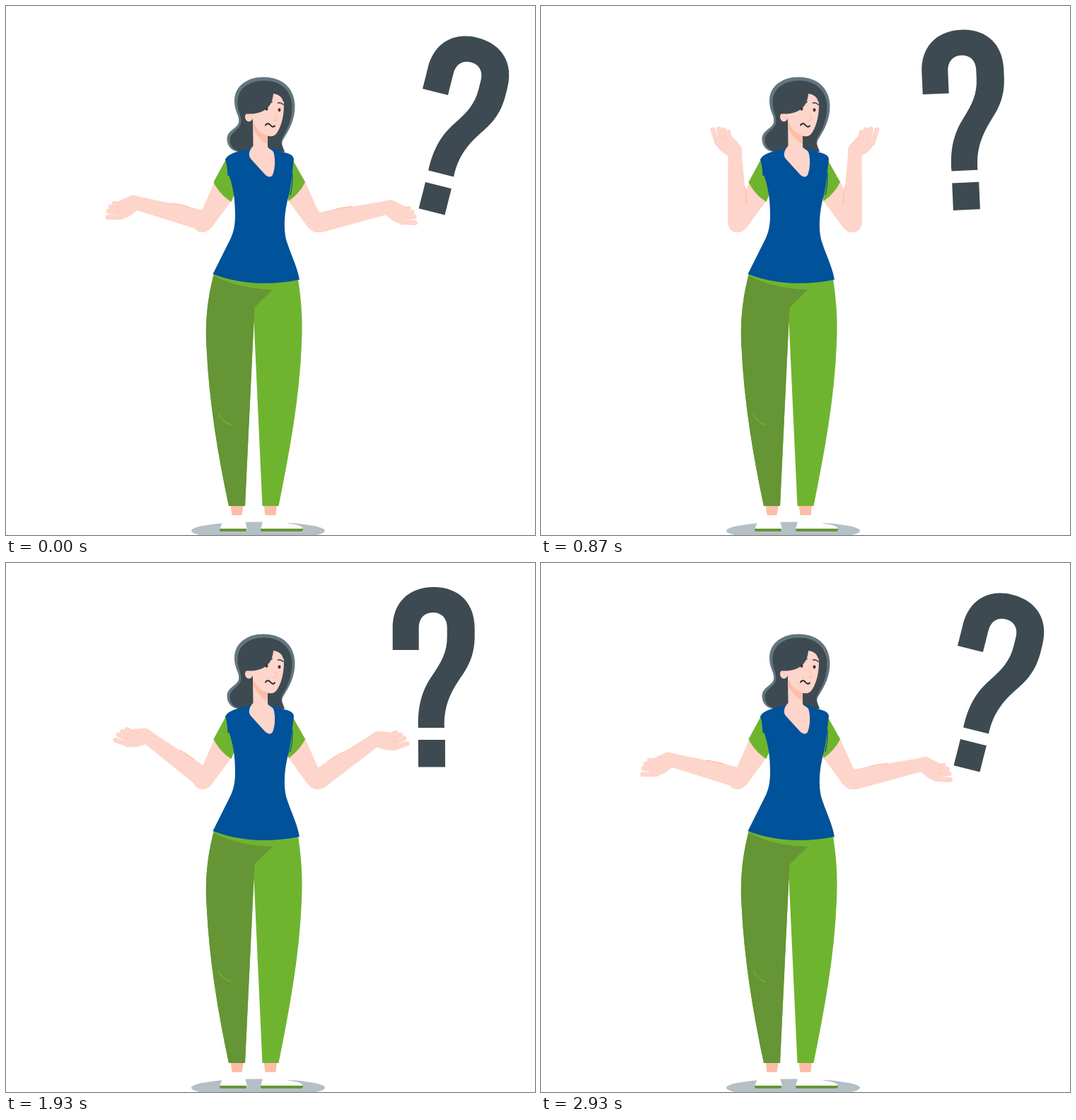
Animation of 748x748 px, one loop 3000 ms. Source, as an HTML page with a canvas:

```html
<!DOCTYPE html>
<html lang="en">
<head>
<meta charset="utf-8">
<title>Shrug</title>
<style>
  html, body { margin: 0; width: 100%; height: 100%; overflow: hidden; background: #fff; }
  canvas { display: block; width: 748px; height: 748px; }
</style>
</head>
<body>
<canvas id="stage" width="748" height="748"></canvas>
<script>
(() => {
const ctx = document.getElementById('stage').getContext('2d');
const LOOP = 3000, STEP = 1000 / 30, END = 2933;

const C = {
  skin: '#fed5ca', blush: '#fdbda6', ink: '#3e4a51', rim: '#64767f',
  blue: '#00529a', green: '#6fb42e', moss: '#659534', shade: '#b4c0c5', eye: '#49332d'
};

const fill = (d, color) => { ctx.fillStyle = color; ctx.fill(new Path2D(d)); };
const line = (d, color, width) => {
  ctx.strokeStyle = color;
  ctx.lineWidth = width;
  ctx.lineCap = ctx.lineJoin = 'round';
  ctx.stroke(new Path2D(d));
};
const oval = (x, y, rx, ry, color) => {
  ctx.fillStyle = color;
  ctx.beginPath();
  ctx.ellipse(x, y, rx, ry, 0, 0, Math.PI * 2);
  ctx.fill();
};
const spin = (x, y, deg) => {
  ctx.translate(x, y);
  ctx.rotate(deg * Math.PI / 180);
  ctx.translate(-x, -y);
};
const clamp = v => Math.min(1, Math.max(0, v));
const smooth = u => u * u * (3 - 2 * u);

// Tilt of the question mark: swings between two angles
const swing = [[0, 14.1], [700, -4.9], [1450, 14.1], [2170, -4.9], [END, 14.1]];
function tilt(t) {
  const i = Math.max(1, swing.findIndex(k => t <= k[0]));
  const [t0, a] = swing[i - 1], [t1, b] = swing[i];
  return a + (b - a) * smooth((t - t0) / (t1 - t0));
}

// 1 = forearms lowered, 0 = raised
const lowered = t => t < 1000 ? 1 - clamp(t / 513) : clamp((t - 1335) / 849);

function mark(deg) {
  ctx.save();
  spin(592, 290, deg);
  fill('M547 123V92C547 57 569 34 605 34C641 34 663 57 663 92V103C663 132 653 148 641 165C627 186 619 205 620 233H583C582 201 589 179 603 159C616 140 624 126 624 104V91C624 78 616 70 604 70C592 70 584 78 584 92V123Z', C.ink);
  fill('M583 250H621V288.5H583Z', C.ink);
  ctx.restore();
}

function forearm(k, turn) {
  spin(277, 304, -turn * k);
  fill('M264.5 212L264 298C263 313 269 320 278 320C286 320 291 314 292 304L291 280L288 254L284 211C284 204 285 199 279 194L270 184L248 190C246 200 255 206 264.5 212Z', C.skin);
  line('M249 194L243 175', C.skin, 7);
  line('M255 193L251.5 174', C.skin, 7);
  line('M261 191L258.5 175', C.skin, 7);
  line('M268 191L265 178', C.skin, 6);
  line('M254.5 184L256 188M261 183L262 187', C.blush, .7);
  line('M288 255Q290.5 266 290.5 280', C.blush, 1.2);
}

// Drawn as the left arm; dx, dy shift the forearm as it comes down
function arm(k, turn, dx, dy) {
  fill('M297 244L277 289L264 302C264 315 270 320 278 320C285 320 290 315 294 309L319 275L322 250Z', C.skin);
  ctx.save();
  ctx.translate(dx * k, dy * k);
  forearm(k, turn);
  ctx.restore();
}

function arms(k) {
  arm(k, 73, 0, 0);
  ctx.save();
  ctx.translate(718, 0);
  ctx.scale(-1, 1);
  arm(k, 75, -4, 3);
  ctx.restore();
}

function feet() {
  oval(356.5, 742, 94.5, 12.5, C.shade);
  fill('M302 740L306 730L318 719H335L339 732L341 740Z', '#fff');
  fill('M360 740L363 729L366 719H382L393 729C401 734 419 732 420 740Z', '#fff');
  fill('M302 739H340V741Q340 743 338 743H304Q302 743 302 739Z', C.moss);
  fill('M360 739H420Q420 743 417 743H362Q360 743 360 739Z', C.moss);
  fill('M317.5 705H336L333.5 720H319.5Z', C.blush);
  fill('M364.5 705H383L381.5 720H366.5Z', C.blush);
}

function trousers() {
  fill('M294 378C283 420 282 455 283.5 482C287 560 300 636 315 707H338L350.5 445L362.5 707H385.5C401 630 415 555 418 478C420 440 417 410 412 380Z', C.green);
  fill('M293.5 381C283 420 282 455 283.5 482C287 560 300 636 315 707H338L350.5 445L351.5 426L377 401C345 400 317 394 293.5 381Z', C.moss);
  line('M300.5 577Q306 589 318 592', C.green, 1.5);
}

function hair() {
  fill('M365 100.5C342 100 323 113 323 134C323 150 331 155 329 165C326 174 312 176 312.5 189C313 199 320 206 330 206H394C391 198 388 194 393 187C401 174 409 160 408.5 140C407 113 388 101 365 100.5Z', C.rim);
  fill('M366 105.5C345 105 328 116 327.5 135C327 150 334 155 332 166C329 176 316 179 316.5 190C317 199 323 205 332 206H394C391 198 387 193 391 186C399 173 405 158 404.5 140C403 118 387 106 366 105.5Z', C.ink);
}

function shirt() {
  fill('M313 213L293.5 249C299 261 309 271 318.5 277L325 261Z', C.green);
  fill('M404 215L423 249C417 261 408 270 399.5 276L397 262Z', C.green);
  fill('M346 201L330 205C320 208 313 211 310 217C313 226 313 234 313.5 240L315.5 240C321 256 324 272 324 296C324 312 321 322 317 330L292.5 379C329 393 371 396 415 387C411 366 402 350 396 330C392 312 394 290 399 271C404 252 404 238 407 217C407 211 401 209 394 207L376 201Z', C.blue);
  line('M405 236Q405.5 253 402 267', C.blue, 1.2);
}

function head() {
  // Neck and neckline
  fill('M349 160L349.5 198C344 203 342 211 346 216L366 238C370 242 374 243 377 239C381 230 381 214 378 206C375 202 370 202 370 198V178Z', C.skin);
  fill('M349 172C354 183 361 190 369 195L370 180L352 160Z', C.blush);
  // Face and ear
  oval(343.5, 157, 5.5, 6.5, C.skin);
  fill('M346 143C347 164 354 177 366 182C374 186 380 185 384 178C390 168 393 154 393 140C393 132 392 127 387 121H370Z', C.skin);
  line('M341.5 155Q345 155 346 159', C.blush, 1);
  // Fringe
  fill('M378 124C377 137 371 146 360 150C351 153 344 153 337.5 152C330 146 328 134 332 124C338 111 351 106 367 106C383 106 393 114 397 128L392 136C391 129 386 125 378 124Z', C.ink);
  // Features
  oval(368.5, 145.5, 2, 2.4, C.eye);
  oval(386.5, 147, 2, 2.4, C.eye);
  line('M384.5 137Q389 136 392 139.5', C.ink, 1.7);
  line('M371 138L376 135.5', C.ink, 1.7);
  line('M380 153Q384.5 159 382 161.5Q380 163 378 161.5', C.blush, 1.2);
  line('M367 168.5C369 165 372 166 374 168.5C376 171 378 171.5 380 169.5', '#25292c', 2);
}

function draw(t) {
  ctx.fillStyle = '#fff';
  ctx.fillRect(0, 0, 748, 748);
  mark(tilt(t));
  feet();
  trousers();
  hair();
  arms(lowered(t));
  shirt();
  head();
}

const start = performance.now();
function tick() {
  const t = (performance.now() - start) % LOOP;
  draw(Math.min(END, Math.floor((t + 4) / STEP) * STEP));
  requestAnimationFrame(tick);
}
tick();
})();
</script>
</body>
</html>
```
